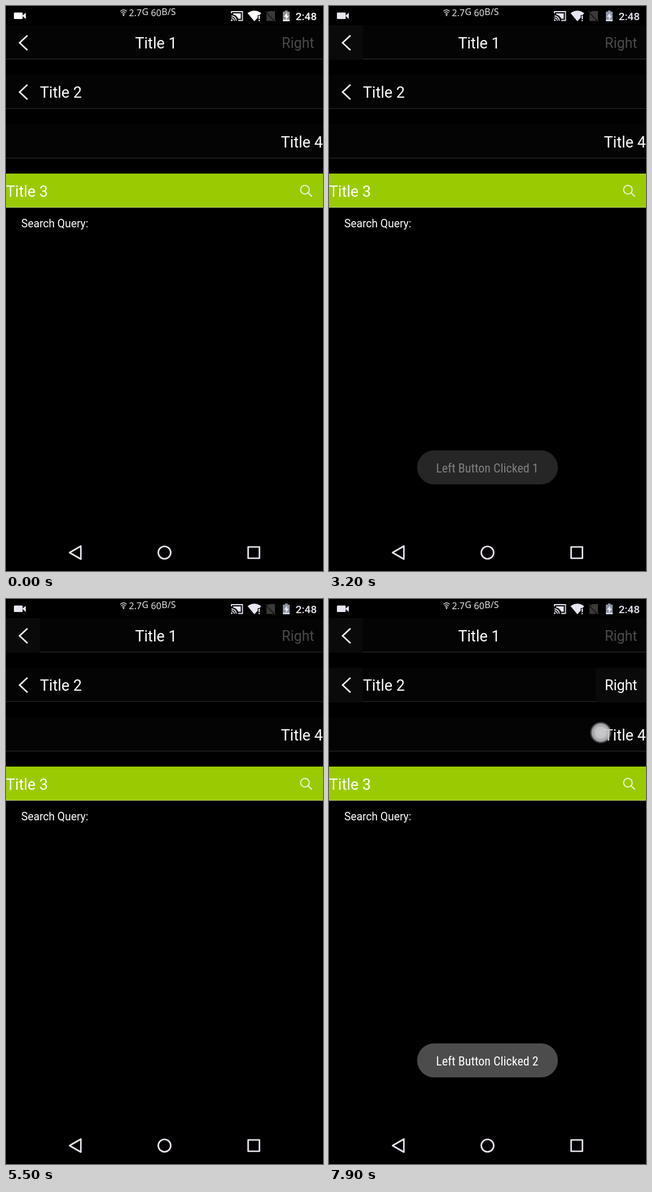
An HTML page for the animation above (8 s loop, 561 by 998 pixels).

```html
<!DOCTYPE html>
<html lang="en">
<head>
<meta charset="utf-8">
<title>Toolbar demo</title>
<style>
  html, body { margin: 0; width: 100%; height: 100%; overflow: hidden; background: #000; }
  svg { display: block; width: 100vw; height: 100vh; }
  text { font-family: Roboto, "Open Sans", sans-serif; fill: #fff; white-space: pre; }
  .title { font-size: 27px; }
  .action { font-size: 25px; }
  .net text { font-family: "Noto Sans", "Open Sans", sans-serif; font-size: 16px; fill: #e4e4e4; }
  .clock { font-size: 19px; font-weight: 500; fill: inherit; }
  .toast { font-family: "Roboto Condensed", Roboto, sans-serif; font-stretch: 75%; font-size: 22px; text-anchor: middle; }
  .line { fill: none; stroke: #f2f2f2; stroke-width: 2.7; }
  .nav { fill: none; stroke: #eee6f2; stroke-width: 2.7; stroke-linejoin: round; }
</style>
</head>
<body>
<svg viewBox="0 0 561 998" preserveAspectRatio="none">
  <defs>
    <radialGradient id="dot">
      <stop offset="0" stop-color="#d8d8da" stop-opacity=".94"/>
      <stop offset=".5" stop-color="#d2d2d4" stop-opacity=".92"/>
      <stop offset=".62" stop-color="#bcbcc0" stop-opacity=".9"/>
      <stop offset=".76" stop-color="#c4c4c8" stop-opacity=".85"/>
      <stop offset=".86" stop-color="#909096" stop-opacity=".55"/>
      <stop offset="1" stop-color="#505058" stop-opacity="0"/>
    </radialGradient>
  </defs>
  <rect width="561" height="998"/>

  <g id="status" fill="#fff">
    <rect x="14" y="11.5" width="15.5" height="11.5" rx="1.5"/>
    <path d="M29 17.2L35 12V23Z"/>
    <g fill="none" stroke="currentColor" style="color:#e8e6f2" stroke-width="1.8">
      <path d="M399 13V10H418.5V25.500H411"/>
      <path d="M399 17.500A8.500 8.500 0 0 1 407.500 26M399 21A5 5 0 0 1 404 26"/>
    </g>
    <path d="M402 13H415.500V22.500H411A13 13 0 0 0 402 15Z"/>
    <circle cx="399.500" cy="25" r="1.500"/>
    <path d="M427.500 12.500Q439.500 4 451.500 12.500L449 16H445.500V20.500L439.500 27Z"/>
    <path d="M447 17H449.300V23H447ZM447 24.500H449.300V26.800H447Z"/>
    <path d="M466 9H476V25L462 11.500ZM461 13L474 26.500H461Z" fill="#393939"/>
    <path d="M460 9.500L477 27" fill="none" stroke="#393939" stroke-width="1.500"/>
    <path id="cell" d="M493.500 8H498.500V10H502V27H490V10H493.500Z" fill="#909090"/>
    <path d="M490 24H502V27H490Z" opacity=".75"/>
    <path d="M497.500 11.500L491.800 19H495.300V25L500.500 17H497.500Z"/>
    <text class="clock" x="512.500" y="24.500">2:48</text>
  </g>

  <g class="net">
    <g fill="none" stroke="#e4e4e4" stroke-width="1.400">
      <path d="M202.500 9.300Q208 4 213.500 9.300M204.300 12Q208 8.600 211.700 12M206 14.500Q208 12.600 210 14.500"/>
    </g>
    <circle cx="208" cy="16.500" r="1.300" fill="#e4e4e4"/>
    <text x="217.500" y="18">2.7</text>
    <text x="240.500" y="16">G</text>
    <text x="256.500" y="18" id="rate"></text>
    <text y="16" id="unit">B/S</text>
  </g>

  <g id="bars"></g>
  <g id="press"></g>

  <text class="title" x="228.400" y="75">Title 1</text>
  <text class="title" x="60" y="162">Title 2</text>
  <text class="title" x="486.500" y="249.500">Title 4</text>
  <path class="line" d="M38 52L24 65L38 78M38 139L24 152L38 165"/>
  <text class="action" x="488" y="74" style="fill:#4a4a4a">Right</text>
  <text class="action" x="488" y="161" id="right2">Right</text>

  <rect y="296" width="561" height="60" fill="#9acb02"/>
  <rect y="355.300" width="561" height=".900" fill="#c6d98c"/>
  <text class="title" x="0" y="337">Title 3</text>
  <g fill="none" stroke="#f4f8e4" stroke-width="1.800">
    <circle cx="529" cy="324.500" r="7.600"/>
    <path d="M534.500 330L541.500 336.500"/>
  </g>
  <text x="27" y="390.500" font-size="19.300">Search Query:</text>

  <g id="toast">
    <rect x="156" y="785" width="249" height="60" rx="30" fill="#4c4c4c"/>
    <text class="toast" x="280" y="824" id="message">Left Button Clicked 1</text>
  </g>

  <g class="nav">
    <path d="M112.500 965.500L132.500 954V977Z"/>
    <circle cx="280.500" cy="965.500" r="11"/>
    <rect x="428.500" y="955.500" width="20" height="20"/>
  </g>
  <circle id="touch" r="20" fill="url(#dot)"/>
</svg>
<script>
const LOOP = 8000, TICK = 100;
const $ = id => document.getElementById(id);
const ramp = (t, a, b) => Math.min(1, Math.max(0, (t - a) / (b - a)));
const latest = (t, list) => list.filter(e => e[0] <= t).pop()[1];

function rect(parent, x, y, w, h, fill) {
  const r = document.createElementNS("http://www.w3.org/2000/svg", "rect");
  Object.entries({ x, y, width: w, height: h, fill }).forEach(([k, v]) => r.setAttribute(k, v));
  return $(parent).appendChild(r);
}

for (const y of [34, 121.5, 209]) {
  rect("bars", 0, y, 561, 59, "#040404");
  rect("bars", 0, y + 59, 561, 1.2, "#2b2b2b");
}

// Button backgrounds: press start, release, end of fade, resting brightness
const buttons = [
  { box: [0, 34, 60, 60], times: [2700, 2800, 3100] },
  { box: [0, 121.5, 60, 60], times: [5800, 5900, 6200] },
  { box: [472, 121.5, 89, 60], times: [6900, 7300, 7800] }
].map(b => ({ ...b, el: rect("press", ...b.box, "#000") }));

const rates = [[0, 60], [300, 120], [1300, 90], [2300, 60], [3600, 120], [4500, 60]];
const taps = [
  { from: 2500, to: 2800, x: 33, y: 70 },
  { from: 3700, to: 4500, x: 512, y: 51 },
  { from: 5600, to: 5900, x: 32, y: 152 },
  { from: 6700, to: 7200, x: 518, y: 147 },
  { from: 7800, to: LOOP, x: 481, y: 236 }
];
const bezier = (u, a, b, c, d) => {
  const v = 1 - u;
  return v * v * v * a + 3 * v * v * u * b + 3 * v * u * u * c + u * u * u * d;
};

function touchAt(t) {
  if (t >= 4500 && t < 5200) {
    const u = ramp(t, 4400, 5100);
    return { x: bezier(u, 512, 524, 518, 413), y: bezier(u, 51, 110, 205, 230) };
  }
  return taps.find(p => t >= p.from && t < p.to);
}

function draw(t) {
  const tint = t < 200 ? "#fff" : "#e8e6f2";
  $("status").setAttribute("fill", tint);
  $("cell").setAttribute("fill", t < 200 ? "#909090" : "#8993a3");

  const rate = latest(t, rates);
  $("rate").textContent = rate;
  $("unit").setAttribute("x", rate > 99 ? 284.5 : 275.3);

  for (const { el, times: [down, up, end] } of buttons) {
    const level = Math.round(10 + 62 * (1 - ramp(t, up, end)));
    el.setAttribute("fill", `rgb(${level},${level},${level})`);
    el.setAttribute("opacity", t >= down ? 1 : 0);
  }
  $("right2").setAttribute("opacity", t >= 6900 ? 1 : 0);
  $("right2").style.fill = t >= 6900 && t < 7300 ? "#d6d6de" : "#fff";

  const first = ramp(t, 2950, 3450) * (1 - ramp(t, 5000, 5400));
  $("toast").setAttribute("opacity", first + ramp(t, 6000, 6500));
  $("message").textContent = "Left Button Clicked " + (t < 5600 ? 1 : 2);

  const touch = touchAt(t);
  $("touch").setAttribute("opacity", touch ? 1 : 0);
  if (touch) $("touch").setAttribute("transform", `translate(${touch.x} ${touch.y})`);
}

// Tighten the message when no condensed face is available
if ($("message").getComputedTextLength() > 190) $("message").style.letterSpacing = "-1.15px";

const start = performance.now();
function frame() {
  const t = (performance.now() - start) % LOOP;
  draw(Math.floor(t / TICK) * TICK);
  requestAnimationFrame(frame);
}
frame();
</script>
</body>
</html>
```
